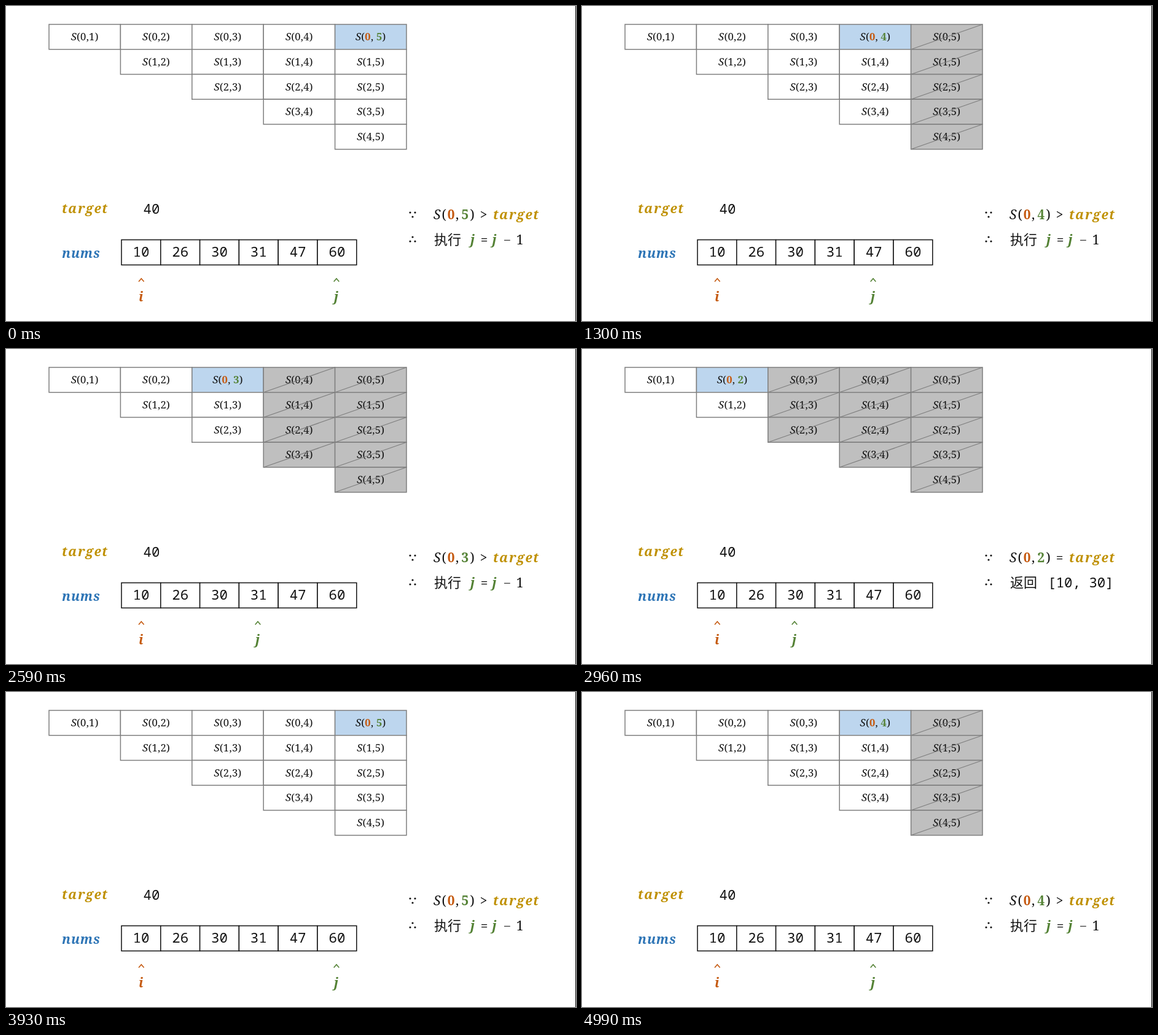
These frames come from a looping animation (928x514 px, 5030 ms). An HTML page:

```html
<!DOCTYPE html>
<html lang="zh">
<head>
<meta charset="utf-8">
<style>
html, body { margin: 0; width: 100%; height: 100%; overflow: hidden; background: #fff; }
svg { display: block; width: 100vw; height: 100vh; }
text { font-family: "Noto Serif", serif; fill: #111; white-space: pre; }
.mono { font: 22.4px "Noto Sans Mono", monospace; }
.han { font: 22px "Noto Sans CJK SC", "Noto Sans CJK", sans-serif; }
.cell { font-size: 16.6px; letter-spacing: .3px; }
.math { font-size: 21px; }
.it { font-style: italic; }
.b { font-weight: bold; }
.var { font-size: 21px; font-style: italic; font-weight: bold; }
</style>
</head>
<body>
<svg id="stage" viewBox="0 0 928 514"></svg>
<script>
const stage = document.getElementById('stage');
const GOLD = '#bf9000', BLUE = '#2e75b6', ORANGE = '#c55a11', GREEN = '#548235';
const nums = [10, 26, 30, 31, 47, 60];
const LOOP = 5030;
// [start time, position of j]
const steps = [[0, 5], [970, 4], [1950, 3], [2960, 2], [3930, 5], [4990, 4]];

const text = (x, y, cls, s, fill = '#111', anchor = 'start', extra = '') =>
  `<text x="${x}" y="${y}" class="${cls}" style="fill:${fill}" text-anchor="${anchor}" ${extra}>${s}</text>`;
const mid = (x, y, cls, s, fill) => text(x, y, cls, s, fill, 'middle');
const box = (x, y, w, h, fill, stroke) =>
  `<rect x="${x}" y="${y}" width="${w}" height="${h}" fill="${fill}" stroke="${stroke}" stroke-width="1.5"/>`;
const line = (d, stroke, w = 1.5) => `<path d="${d}" fill="none" stroke="${stroke}" stroke-width="${w}"/>`;
const dots = list => list.map(([x, y]) => `<circle cx="${x}" cy="${y}" r="1.6" fill="#111"/>`).join('');
const bold = (s, color) => `<tspan class="b" style="fill:${color}">${s}</tspan>`;

function table(j) {
  const w = 116.4, h = 40.75;
  let out = '';
  for (let r = 0; r < 5; r++) {
    for (let c = r + 1; c <= 5; c++) {
      const x = 70 + (c - 1) * w, y = 30 + r * h;
      const active = r === 0 && c === j, gone = c > j;
      const label = active ? `${bold(0, ORANGE)}, ${bold(c, GREEN)}` : `${r},${c}`;
      out += box(x, y, w, h, active ? '#bdd6ee' : gone ? '#bfbfbf' : '#fff', '#7f7f7f');
      out += mid(x + w / 2, y + 26.2, 'cell', `<tspan class="it">S</tspan>(${label})`);
      if (gone) out += line(`M${x} ${y + h}l${w} ${-h}`, '#7f7f7f', 1.3);
    }
  }
  return out;
}

function pointer(x, name, color) {
  return line(`M${x - 4.3} 449.8l4.3 -5l4.3 5`, color, 1.6) + mid(x - .5, 481.5, 'var', name, color);
}

function array(j) {
  const w = 63.8;
  return text(91, 338, 'var', 'target', GOLD, 'start', 'letter-spacing="1.6"') +
    text(223.5, 338.5, 'mono', '40') +
    text(91, 411, 'var', 'nums', BLUE, 'start', 'letter-spacing=".8"') +
    nums.map((n, k) => box(188 + k * w, 381.5, w, 41, '#fff', '#111') +
      mid(188 + (k + .5) * w, 409, 'mono', n)).join('') +
    pointer(220.3, 'i', ORANGE) + pointer(538 - 64 * (5 - j), 'j', GREEN);
}

function reasoning(j) {
  const found = j === 2;
  let out = dots([[658, 337], [666, 337], [662, 344]]) + dots([[662, 377], [658, 384], [666, 384]]) +
    text(696, 348, 'math it', 'S') + text(709.5, 348, 'math', '(') +
    mid(724.7, 348, 'math b', 0, ORANGE) + text(732, 348, 'math', ',') +
    mid(747.3, 348, 'math b', j, GREEN) + text(755.5, 348, 'math', ')') +
    mid(777.5, 348, 'math', found ? '=' : '&gt;') +
    text(793, 348, 'var', 'target', GOLD, 'start', 'letter-spacing="1.6"') +
    text(697, 389, 'han', found ? '返回' : '执行');
  if (found) return out + mid(812, 388.5, 'mono', '[10, 30]');
  return out + mid(759.5, 389, 'var', 'j', GREEN) + mid(778.5, 389, 'math', '=') +
    mid(795, 389, 'var', 'j', GREEN) + mid(816, 389, 'math', '−') + mid(836.5, 389, 'math', 1);
}

let shown = null;
function draw(now) {
  const t = now % LOOP;
  const j = steps.filter(s => s[0] <= t).pop()[1];
  if (j !== shown) {
    stage.innerHTML = table(j) + array(j) + reasoning(j) + line('M927.5 0V514', '#111', 1);
    shown = j;
  }
  requestAnimationFrame(draw);
}
draw(0);
</script>
</body>
</html>
```
